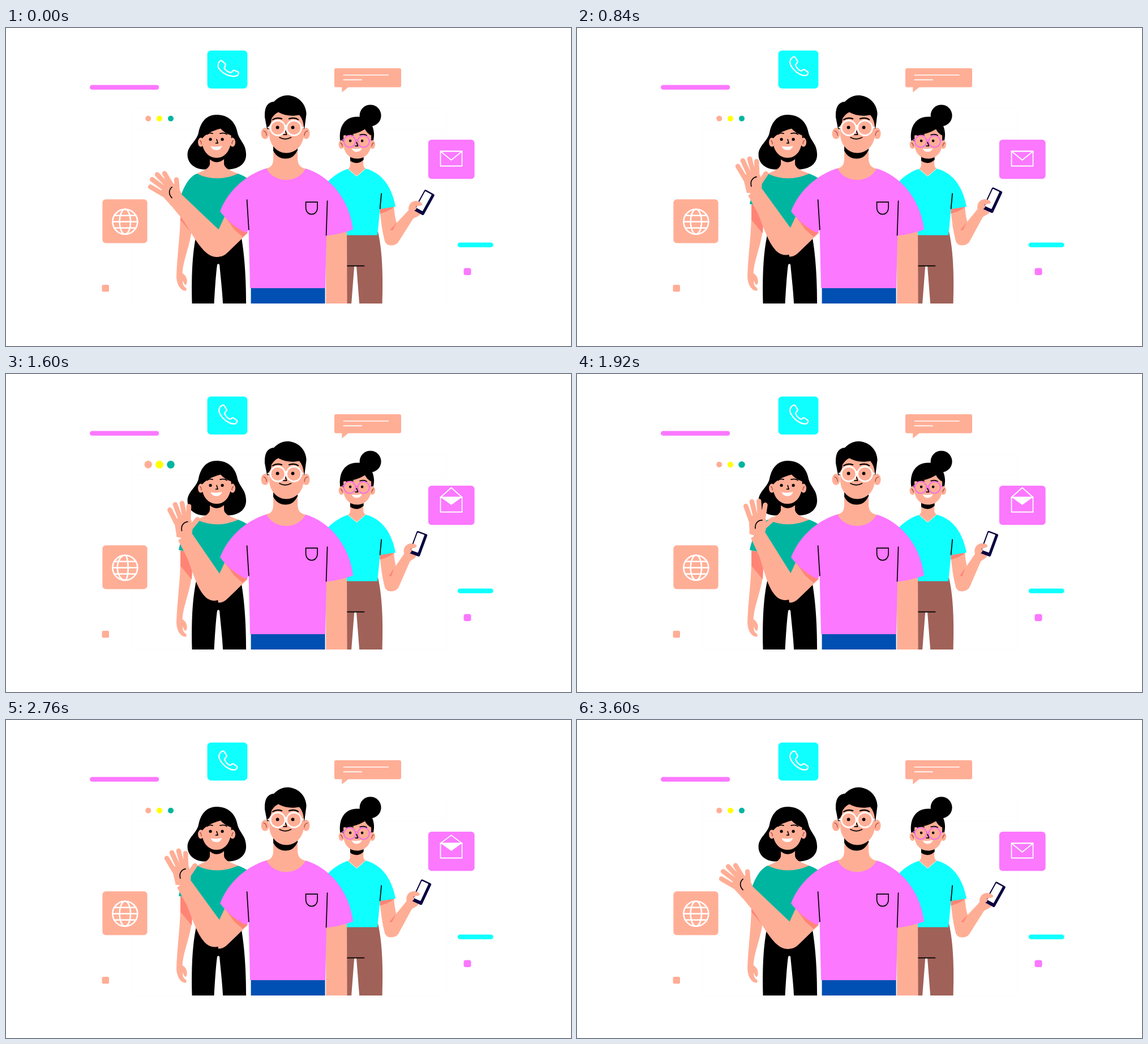
Recreate the animation shown at these times as an HTML page. Size 998x561 px, loop 3640 ms.

```html
<!DOCTYPE html>
<html lang="en">
<head>
<meta charset="utf-8">
<title>Team wave</title>
<style>
html, body { margin: 0; width: 100%; height: 100%; overflow: hidden; background: #fff; }
svg { display: block; width: 998px; height: 561px; }
.skin { fill: #ffae96; }
.shade { fill: #ff8475; }
.mag { fill: #fb78ff; }
.cyan { fill: #0fffff; }
.green { fill: #00b5a0; }
.line { fill: none; stroke: #000; stroke-width: 1.7; stroke-linecap: round; stroke-linejoin: round; }
.white { fill: none; stroke: #fff; stroke-width: 2; stroke-linejoin: round; stroke-linecap: round; }
.finger { fill: none; stroke: #ffae96; stroke-width: 8.5; stroke-linecap: round; }
.ear { fill: none; stroke: #a34a40; stroke-width: 1.3; stroke-linecap: round; }
</style>
</head>
<body>
<svg viewBox="0 0 998 561">
  <!-- window -->
  <g fill="none" stroke="#fcfcfc">
    <rect x="220.500" y="141.500" width="558" height="345" rx="3"/>
    <path d="M221 178H778"/>
  </g>
  <circle class="dot skin" cx="251.200" cy="159.800" r="5"/>
  <circle class="dot" cx="271" cy="159.800" r="5" fill="#ff0"/>
  <circle class="dot green" cx="291" cy="159.800" r="5"/>

  <!-- ornaments -->
  <rect class="mag" x="148" y="100.500" width="122.300" height="8.300" rx="4.150"/>
  <rect class="cyan" x="797.700" y="378.500" width="63" height="8.300" rx="4.150"/>
  <rect class="skin" x="169.500" y="453" width="12.500" height="12.300" rx="2.500"/>
  <rect class="mag" x="808.500" y="423.500" width="13" height="12.500" rx="3.500"/>

  <!-- tiles -->
  <rect class="cyan" x="355.600" y="39.700" width="70.800" height="67" rx="6.500"/>
  <path id="call" class="white" style="stroke-width:2.300" d="M-15-11C-13-16-8-19-6-15L-2.500-9.500C-1-6-6-4.500-6-2C-4 3-1 6 3 8C6 9 7 4 10 6L15 9.500C18 11.500 15 15 13 16C7 18-4 12-9 6C-14 0-18-6-15-11Z"/>
  <rect class="skin" x="170.300" y="302.300" width="79.300" height="77.300" rx="6"/>
  <g class="white" style="stroke-width:2.600">
    <circle cx="210.300" cy="341.800" r="22"/>
    <path d="M191.300 330.800H229.300M188.300 341.800H232.300M191.300 352.800H229.300"/>
    <path class="meridian"/><path class="meridian"/>
  </g>
  <rect class="mag" x="745.800" y="197" width="81.800" height="69.300" rx="6"/>
  <path fill="#fff" d="M768.500 218H804.500L786.500 231Z"/>
  <path class="white" style="stroke-width:1.800;stroke-linejoin:miter" d="M767.500 217.500H805.500V243.500H767.500Z"/>
  <path id="flap" class="white" style="fill:#fb78ff;stroke-width:1.800"/>
  <path class="skin" d="M583 71H695Q698 71 698 74V101.500Q698 104.500 695 104.500H604.500L593.300 113.500V104.500H583Q580 104.500 580 101.500V74Q580 71 583 71Z"/>
  <path class="white" style="stroke-width:1.700" d="M596.500 83H675M596.500 91.300H628"/>

  <g transform="translate(-.9 -.4)">
  <!-- left woman -->
  <path d="M373 153.500C395 153.500 407 168 410 186C414 200 425 205 425 224C425 241 410 250 392 250H352C335 250 321.500 240 321.500 224C321.500 208 338 200 341 185C345 165 356 153.500 373 153.500Z"/>
  <path class="skin" d="M309 312C310 360 303 400 302 438C302 454 310 464 318 464C321 463 320 459 316 457Q312 452 313.500 446Q315 452 318 454C323 450 321 438 312.500 433C314 410 324 390 329 358L331 316Z"/>
  <path class="shade" d="M309 312L331 316L329 363L309 339Z"/>
  <path d="M338 361C331 390 328 430 329.500 486.400H368.500C370 460 372 430 374 418Q376 415 378 418C380 440 383 465 384 486.400H425C425 440 422 395 415 361Z"/>
  <path class="green" d="M338 257.500C322 263 310 290 306 311L331 316L338 362H404L430 310V268C424 263 418 260 411 257.500Z"/>
  <path class="skin" d="M361 222V240C360 250 346 253 338 257.500Q373 274 411 257.500C402 253 387 250 386 240V222Z"/>
  <path d="M359.500 222Q373 229 387 222V231Q374 243 360.500 232Z"/>
  <ellipse class="skin" cx="345" cy="202" rx="5" ry="8"/>
  <ellipse class="skin" cx="401" cy="202" rx="5" ry="8"/>
  <path class="ear" d="M343.500 199Q346 200 346 205M402.500 199Q400 200 400 205"/>
  <path class="skin" d="M347 196Q356 184 380 178Q387 186 398.500 190C400 211 391 229.500 373 229.500C355 229.500 346 212 347 196Z"/>
  <path class="line" d="M356 188Q360 184.500 366 186.500M379 186.500Q387 184.500 391 188"/>
  <path class="line" d="M373 197L375 203.500H371.500"/>
  <circle cx="362" cy="196.800" r="2.600"/><circle cx="383" cy="196.800" r="2.600"/>
  <path fill="#fff" d="M362.500 209Q373 211 382.500 208.500Q380 216 373 216Q365 216 362.500 209Z"/>

  <!-- right woman -->
  <path d="M600 360V486.400H611L616 422Q618 418.500 620 422L625 486.400H665.500C667 440 666 395 658 360Z" fill="#a06158"/>
  <path class="line" d="M603 420H633.500"/>
  <path class="skin" d="M661 316L686 314Q687 332 691 345L689 381Q675 388 670 377Q663 350 661 316Z"/>
  <path class="shade" d="M661 318L687 316Q677 324 661.500 328ZM679 357L691 345L688 353Z"/>
  <g id="fore">
    <path class="skin" d="M679 357L712 322C711 312 717 305.500 726 305.500L735 309L732 330C728 334 724 334 720 337L694 378C689 386 674 386 671 377Z"/>
    <path class="shade" d="M679 357L691 344L684 357Z"/>
    <g transform="translate(739.5 308.2) rotate(29)">
      <rect x="-10" y="-21" width="20" height="42" rx="2.500" fill="#090440"/>
      <rect x="-8" y="-18.500" width="13" height="33.500" rx="1" fill="#fff"/>
    </g>
    <path class="skin" d="M717 309Q726 303 735 309Q738 313 733 314L725 315Q728 321 721 323L714 322Z"/>
  </g>
  <path class="cyan" d="M605 249C590 254 578 262 569 272L590 366H657L661.500 320L689 315.500C682 280 665 256 636 248.500L620 262Z"/>
  <path class="line" d="M664 292.500L661.500 319"/>
  <path class="skin" d="M609 222V240Q609 247 605 249L620.500 262L636 248.500Q632 246 632 240V222Z"/>
  <path d="M605 249L620.500 262L636 248.500" fill="none" stroke="#fff3cf"/>
  <path d="M608.500 222H632.500V233Q622 243 609 235Z"/>
  <circle cx="644.500" cy="154.800" r="19"/>
  <path d="M592 204C587 181 595 157 622 157C645 157 654 178 650 198L641 207H598Z"/>
  <ellipse class="skin" cx="593.500" cy="206" rx="5" ry="7.500"/>
  <ellipse class="skin" cx="648" cy="206" rx="5" ry="7.500"/>
  <path class="ear" d="M592 203Q595 205 595 209M650 203Q647 205 647 209"/>
  <path class="skin" d="M597 190Q619 189 635 179Q639 187 646 190V205C645 221 635 231 621 231C606 231 597 219 597 204Z"/>
  <path class="line" d="M602 190Q607 186.500 614 189M626 189Q634 186.500 638 190"/>
  <path class="line" d="M620 202L622.500 208.500H618"/>
  <circle cx="609" cy="199.500" r="2.300"/><circle cx="630" cy="199.500" r="2.300"/>
  <g fill="none" stroke="#f06cf0" stroke-width="1.800">
    <circle cx="608" cy="200.500" r="10.200"/><circle cx="632.500" cy="200.500" r="10.200"/>
    <path d="M618 199Q620 197 622 199M598 199L595 197M642 199L646 198"/>
  </g>
  <path fill="#fff" d="M611.500 213Q620 214.500 629.500 212.500Q627 219 620.500 219Q614 219 611.500 213Z"/>

  <!-- man: raised arm -->
  <path class="skin" d="M388 331L428 362L394 395C388 401 383 404 376 404L370 370Z"/>
  <g id="arm">
    <path class="skin" d="M311 294L370 350L394 372L390 396C380 407 367 407 356 398C342 387 330 365 315 341L292 313Z"/>
    <g id="hand">
      <path class="finger" d="M256 280.500L279 294M259 267.500L284 286M268 259L290 282M281 257L296 282"/>
      <path id="thumb" class="finger" d="M302 268L304 292"/>
      <path class="skin" d="M312 296C310 287 304 283 298 275L285 276L273 289C277 300 286 305 292 314L306 309Z"/>
      <path class="line" d="M294 281C288 286 288 294 294 300"/>
    </g>
  </g>
  <path class="shade" d="M386 331L428 361L419 369L404 356Z"/>

  <!-- man: body -->
  <path class="skin" d="M566 360L603 354L603.500 486.400H566Z"/>
  <rect x="433.500" y="457" width="131" height="29.400" fill="#004fb3"/>
  <path class="mag" d="M461 248C425 259 393 287 379 324Q398 349 425 362L429.500 357L432 459.500H565L567 367Q592 364 614 356C608 306 576 262 530 248.500Z"/>
  <path class="line" d="M426.500 303.500L429.800 356M568.500 305.500L566.500 366"/>
  <path class="line" style="stroke-linejoin:miter" d="M530.500 307.500H551V317C551 333 530.500 333 530.500 317Z"/>
  <path class="skin" d="M473 200V233C472 245 467 246 461 248.500C475 275 516 275 530 249C521 246 517 243 516 232V200Z"/>
  <path d="M473 205H516V216Q509 231 495 231Q480 231 473 217Z"/>

  <!-- man: head -->
  <path d="M462 179L458 158C457 140 463 131 474 130.500C482 122 492 118 502 119.500C520 122 531 136 531.500 152L528 179Z"/>
  <ellipse class="skin" cx="458.500" cy="186.500" rx="7" ry="10"/>
  <ellipse class="skin" cx="531" cy="186.500" rx="6.500" ry="10"/>
  <path class="ear" d="M456 182Q461 183 461 190M533.500 182Q528 183 528 190"/>
  <path class="skin" d="M465 174Q470 168 470 160Q476 151 482 149Q498 158 519 154Q526 162 527 175V189C526 209 511 221 496 221C481 221 467 208 466 190Z"/>
  <path class="line" style="stroke-width:2.300" d="M472 162Q479 157.500 488 160.500M501 160.500Q511 157.500 517 162"/>
  <path class="line" d="M493.500 179L496.500 188.500H491M484 193.500Q494 199 504.500 193.500"/>
  <circle cx="480.500" cy="175.800" r="2.900"/><circle cx="507.500" cy="175.800" r="2.900"/>
  <g class="white" style="stroke-width:2.700">
    <circle cx="481" cy="176.700" r="13"/><circle cx="509.500" cy="176.700" r="13"/>
    <path d="M493.500 174Q495.300 172 497 174M468 176H464M522.500 176H526"/>
  </g>
  </g>
</svg>
<script>
const LOOP = 3640, STEP = 40, TAU = Math.PI * 2;
const $ = id => document.getElementById(id);
const all = name => [...document.querySelectorAll(name)];
const dots = all('.dot'), meridians = all('.meridian');
const set = (el, name, value) => el.setAttribute(name, value);
const turn = (id, deg, x, y, dy = 0) =>
  set($(id), 'transform', `translate(0 ${dy}) rotate(${deg} ${x} ${y})`);

// 0 to 1 and back once per period
const swing = (t, period) => (1 - Math.cos(TAU * t / period)) / 2;
// eased 0 to 1 between two times
const ease = (t, from, to) => {
  const k = Math.min(1, Math.max(0, (t - from) / (to - from)));
  return k * k * (3 - 2 * k);
};
const bump = (t, mid, half) => {
  const d = Math.abs(t - mid) / half;
  return d < 1 ? Math.cos(d * Math.PI / 2) ** 2 : 0;
};

function drawGlobe(t) {
  const spin = 180 * (ease(t, 0, 840) + ease(t, 840, 1740));
  meridians.forEach((el, i) => {
    const lon = (spin + (i ? 26 : -26) + 90) % 180 - 90;
    const rx = 22 * Math.sin(lon * Math.PI / 180);
    set(el, 'd', `M210.3 319.8A${Math.abs(rx) + 0.01} 22 0 0 ${rx > 0 ? 1 : 0} 210.3 363.8`);
  });
}

function draw(t) {
  const wave = swing(t, 1200);
  turn('arm', 16 * wave, 380, 366, -3 * wave);
  turn('hand', 28 * wave, 307, 300);
  turn('thumb', 15 * wave, 304, 290);
  turn('fore', -9 * swing(t, 3600), 680, 372);

  const ring = Math.max(0, 1 - t / 1200);
  const lift = ring ? 5 * Math.sin(Math.PI * t / 1200) : 0;
  const tilt = -15 * ring * Math.cos(TAU * t / 480);
  set($('call'), 'transform', `translate(392 ${71.6 - lift}) rotate(${tilt})`);

  const open = ease(t, 860, 1300) - ease(t, 2670, 3160);
  set($('flap'), 'd', `M767.5 217.5L786.5 ${233 - 32.5 * open}L805.5 217.5Z`);

  drawGlobe(t);
  dots.forEach((el, i) => set(el, 'r', 5 + 2 * bump(t, [1500, 1560, 1680][i], 420)));
}

function tick() {
  const t = performance.now() % LOOP;
  draw(Math.floor(t / STEP) * STEP);
  requestAnimationFrame(tick);
}
tick();
</script>
</body>
</html>
```
